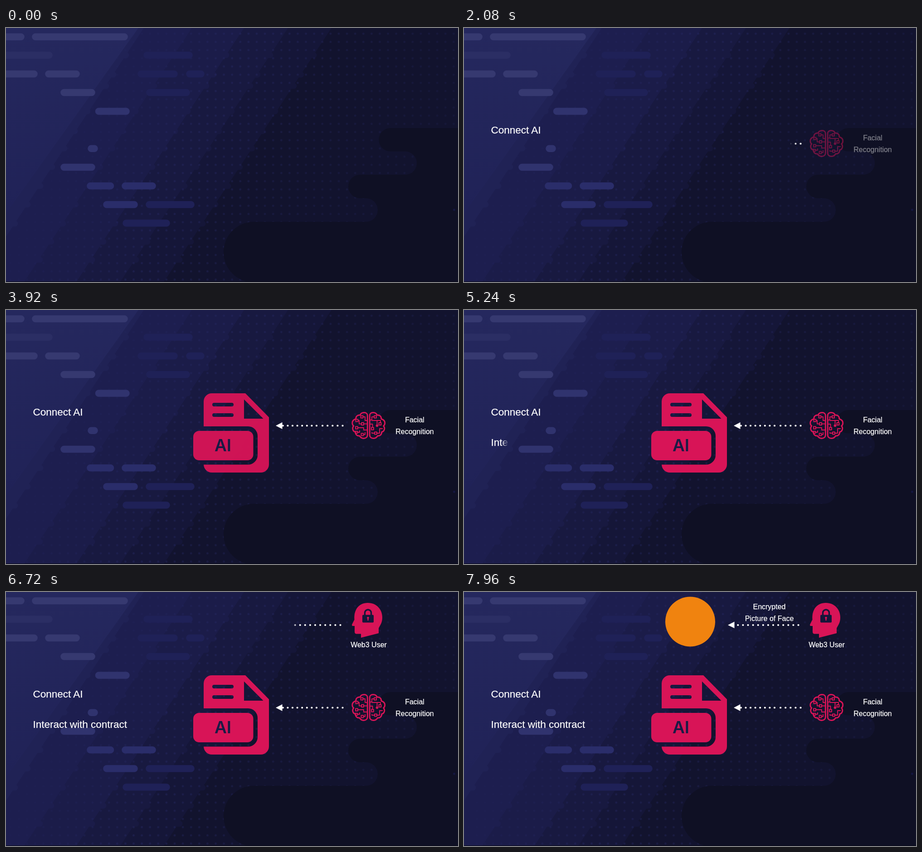
Write an HTML page without scripts that moves like this. It is 997 px wide and 561 px high and loops after 8 s.

```html
<!DOCTYPE html>
<html lang="en">
<head>
<meta charset="utf-8">
<title>Connect AI</title>
<style>
html, body { margin: 0; width: 100%; height: 100%; overflow: hidden; background: #12132e; }
svg { display: block; width: 100vw; height: 100vh; }
text { font-family: "Liberation Sans", Arial, sans-serif; fill: #fff; stroke: #fff; stroke-width: .25; }
.title { font-size: 22.5px; }
.label { font-size: 16px; text-anchor: middle; }
.label, .icon { --pink: #d81457; }
.dots { stroke: #fff; stroke-width: 4.2; stroke-linecap: round; fill: none; }
.band { stroke: currentColor; stroke-width: 0; fill: currentColor; }
.steps { fill: none; stroke: currentColor; stroke-width: 13; stroke-linecap: round; }
.pills { fill: none; stroke-width: 15.6; stroke-linecap: round; }

.brain, .file, .user, .note, .badge, .wipe { animation: 8s linear infinite; }
.brain { animation-name: brain; }
.file { animation-name: file; }
.user { animation-name: user; }
.note { animation-name: note; }
.badge { animation-name: badge; }
#wipe1 { animation-name: wipe1; }
#wipe2 { animation-name: wipe2; }
#wipe3 { animation-name: wipe3; }
#wipe4 { animation-name: wipe4; }

/* 1% = 80 ms */
@keyframes brain { 0%, 23.49% { opacity: 0 } 23.5% { opacity: .08 } 29.5%, 100% { opacity: 1 } }
@keyframes file { 0%, 42.99% { opacity: 0 } 43% { opacity: .14 } 49%, 63.99% { opacity: .96 } 64%, 100% { opacity: 1 } }
@keyframes user { 0%, 73.99% { opacity: 0 } 74% { opacity: .08 } 80%, 100% { opacity: 1 } }
@keyframes note { 0%, 85.5% { opacity: 0 } 91.5%, 100% { opacity: 1 } }
@keyframes badge { 0%, 92.99% { opacity: 0 } 93% { opacity: .08 } 99%, 100% { opacity: 1 } }
@keyframes wipe1 { 0%, 13.9% { transform: translateX(60px) } 21%, 100% { transform: translateX(190px) } }
@keyframes wipe2 { 0%, 63.9% { transform: translateX(60px) } 73.5%, 100% { transform: translateX(290px) } }
@keyframes wipe3 {
  0%, 23.2% { transform: translateX(745px) }
  26% { transform: translateX(719px) }
  33.6% { transform: translateX(673px) }
  41%, 100% { transform: translateX(580px) }
}
@keyframes wipe4 { 0%, 80% { transform: translateX(740px) } 86.2%, 100% { transform: translateX(566px) } }
</style>
</head>
<body>
<svg viewBox="0 0 997 561" preserveAspectRatio="none">
  <defs>
    <linearGradient id="left" x2="0" y2="1">
      <stop stop-color="#25285e"/><stop offset="1" stop-color="#202257"/>
    </linearGradient>
    <linearGradient id="fadeRight">
      <stop offset=".95" stop-color="#fff"/><stop offset="1" stop-color="#fff" stop-opacity="0"/>
    </linearGradient>
    <linearGradient id="fadeLeft">
      <stop stop-color="#fff" stop-opacity="0"/><stop offset=".05" stop-color="#fff"/>
    </linearGradient>
    <pattern id="grid" width="18.1" height="18.1" x="1" y="3.5" patternUnits="userSpaceOnUse">
      <circle cx="9" cy="9" r="2.4" fill="#2a2d6b"/>
    </pattern>
    <linearGradient id="gridFade" x2="1" y2=".25">
      <stop offset=".15" stop-color="#000"/><stop offset=".5" stop-color="#fff"/><stop offset="1" stop-color="#777"/>
    </linearGradient>
    <mask id="gridMask"><rect width="997" height="561" fill="url(#gridFade)"/></mask>

    <!-- slanted band ending in pill-shaped steps -->
    <g id="band">
      <path class="band" d="M-800 0H0L-370 561H-800Z"/>
      <path class="steps" d="M-60 60h21M-100 103h33M-125 128h42M-160 184h36M-200 228h48M-225 266h50M-260 307h58M-280 349h52M-310 390h54M-340 432h56M-360 472h50M-385 512h50"/>
    </g>

    <mask id="mask1" maskUnits="userSpaceOnUse" x="0" y="0" width="997" height="561">
      <rect id="wipe1" class="wipe" x="-320" width="320" height="561" fill="url(#fadeRight)"/>
    </mask>
    <mask id="mask2" maskUnits="userSpaceOnUse" x="0" y="0" width="997" height="561">
      <rect id="wipe2" class="wipe" x="-320" width="320" height="561" fill="url(#fadeRight)"/>
    </mask>
    <mask id="mask3" maskUnits="userSpaceOnUse" x="0" y="0" width="997" height="561">
      <rect id="wipe3" class="wipe" width="300" height="561" fill="url(#fadeLeft)"/>
    </mask>
    <mask id="mask4" maskUnits="userSpaceOnUse" x="0" y="0" width="997" height="561">
      <rect id="wipe4" class="wipe" width="300" height="561" fill="url(#fadeLeft)"/>
    </mask>

    <path id="hemisphere" d="M797.3 233c0-4-3-6.500-7.500-6.500-4 0-7.500 2-8.500 5.500-6-.5-10 3-9.500 8.500-5 1.500-8 5-8 9 0 3 1 5 3 6.500-4 5-2 12 4 13.500 0 6 4 9 9 8.500 2 3.500 5 5.500 9 5.500 5 0 8.500-3 8.500-7Z"/>
    <path id="head" d="M783 101V92.500H774c-4 0-5-2-5-5V75h-4c-2 0-2.500-2-1.500-4l5-10C767 39 778 24 798 24c20 0 32 15 32 32 0 13-5 17-8 24V91Z"/>
  </defs>

  <!-- background -->
  <rect width="997" height="561" fill="#12132e"/>
  <use href="#band" x="718" color="#151638"/>
  <use href="#band" x="622" color="#181940"/>
  <use href="#band" x="525" color="#1b1c49"/>
  <use href="#band" x="410" color="#1d1e4f"/>
  <use href="#band" x="304" color="#202255"/>
  <path d="M0 0H292L0 410Z" fill="url(#left)"/>
  <rect width="997" height="561" fill="url(#grid)" opacity=".36" mask="url(#gridMask)"/>
  <g class="pills">
    <path stroke="#363970" d="M-9 19.500H33M65 19.500H261M-9 101.500H62M94 101.500H155M128 142.500H189"/>
    <path stroke="#2b2e64" d="M-9 60H95"/>
    <path stroke="#30336e" d="M204.500 184H265M188 266.300H195M128 307.500H189"/>
    <path stroke="#2a2d6a" d="M186 348.700H230.500M263 348.700H323M222 390H283"/>
    <path stroke="#1f2157" d="M311 60H404M298 101.500H371M405 101.500H430M317 142.500H398M316 390H408M265 431H354"/>
  </g>
  <path fill="#0f1024" d="M997 221H848a25.700 25.700 0 0 0 0 51.500H882a25.800 25.800 0 0 1 0 51.500H781a26 26 0 0 0 0 52H794a26 26 0 0 1 0 52H547c-37 0-67 30-67 67 0 32 22 58 52 66H997Z"/>
  <circle cx="988.500" cy="401.500" r="2.500" fill="#15173f"/>
  <path d="M0 560.500H997" stroke="#090a18"/>

  <!-- headings -->
  <text class="title" x="59.400" y="233" mask="url(#mask1)">Connect AI</text>
  <text class="title" x="59.400" y="300" mask="url(#mask2)">Interact with contract</text>

  <!-- facial recognition -->
  <g class="brain">
    <g fill="none" stroke="#d81457" stroke-width="2.900" stroke-linejoin="round">
      <use href="#hemisphere"/>
      <use href="#hemisphere" transform="matrix(-1 0 0 1 1599.500 0)"/>
      <g stroke-width="1.900">
        <path d="M782.500 233.500h5v5h-5zM771.500 241.500h5v5h-5zM784 249h5v5h-5zM771 257.500h5v5h-5zM770.500 268h5v4h-5zM783.500 272.500h5v5h-5z"/>
        <path d="M787.500 236H792V244H797M776.500 244H779V251.500H784M789 251.500H797M776 260H789V265H797M775.500 270H780V266M788.500 275H792V270"/>
        <path d="M812 233.500h5v5h-5zM822.500 249h5v5h-5zM806 259.500h5v5h-5zM813 269.500h5v5h-5z"/>
        <path d="M812 236H807V243H803M807 244H826V249M818.500 244V255M803 252H808.500V259.500M813 272H807V270M818 272H824V262H831"/>
      </g>
    </g>
    <circle cx="818.500" cy="255.500" r="2.800" fill="#d81457"/>
    <g class="label"><text x="901.500" y="248">Facial</text><text x="901.500" y="274">Recognition</text></g>
  </g>
  <g mask="url(#mask3)">
    <path class="dots" stroke-dasharray="0 11.100" d="M742.500 255.500H697"/>
    <path class="dots" stroke-dasharray="0 10.600" d="M685 255.500H610"/>
    <path fill="#fff" d="M595 255.500L609.500 248V263Z"/>
  </g>

  <!-- AI file -->
  <g class="file">
    <path fill="#d81457" fill-rule="evenodd" d="M436 257V202a18 18 0 0 1 18-18H528L580 237V341a18 18 0 0 1-18 18H454a18 18 0 0 1-18-17.500H534a21 21 0 0 0 21-21V278a21 21 0 0 0-21-21ZM525 197.500V240H567.500ZM459 205a4 4 0 0 0 0 8H498a4 4 0 0 0 0-8ZM459 228a4 4 0 0 0 0 8H498a4 4 0 0 0 0-8Z"/>
    <rect x="413" y="267" width="132.500" height="65" rx="13" fill="#d81457"/>
    <text x="478.500" y="312" text-anchor="middle" style="font:600 37px Inter,sans-serif;fill:#1a1b45;stroke:none">AI</text>
  </g>

  <!-- user -->
  <g class="user">
    <use href="#head" fill="#d81457"/>
    <path d="M791.500 52V46a7 7 0 0 1 14 0V52" fill="none" stroke="#15163a" stroke-width="3.400"/>
    <rect x="786" y="50.500" width="25" height="17" rx="2" fill="#15163a"/>
    <path d="M798.500 57V62" stroke="#d81457" stroke-width="2.400" stroke-linecap="round"/>
    <circle cx="798.500" cy="57" r="2.300" fill="#d81457"/>
    <text class="label" x="800" y="121.500">Web3 User</text>
  </g>
  <g mask="url(#mask4)">
    <path class="dots" stroke-dasharray="0 11.100" d="M737.500 73H602"/>
    <path fill="#fff" d="M582 73L596.500 65.500V80Z"/>
  </g>
  <g class="label note"><text x="673.500" y="38">Encrypted</text><text x="673.500" y="64">Picture of Face</text></g>

  <circle class="badge" cx="499" cy="65.500" r="55" fill="#f0830f"/>
</svg>
</body>
</html>
```
